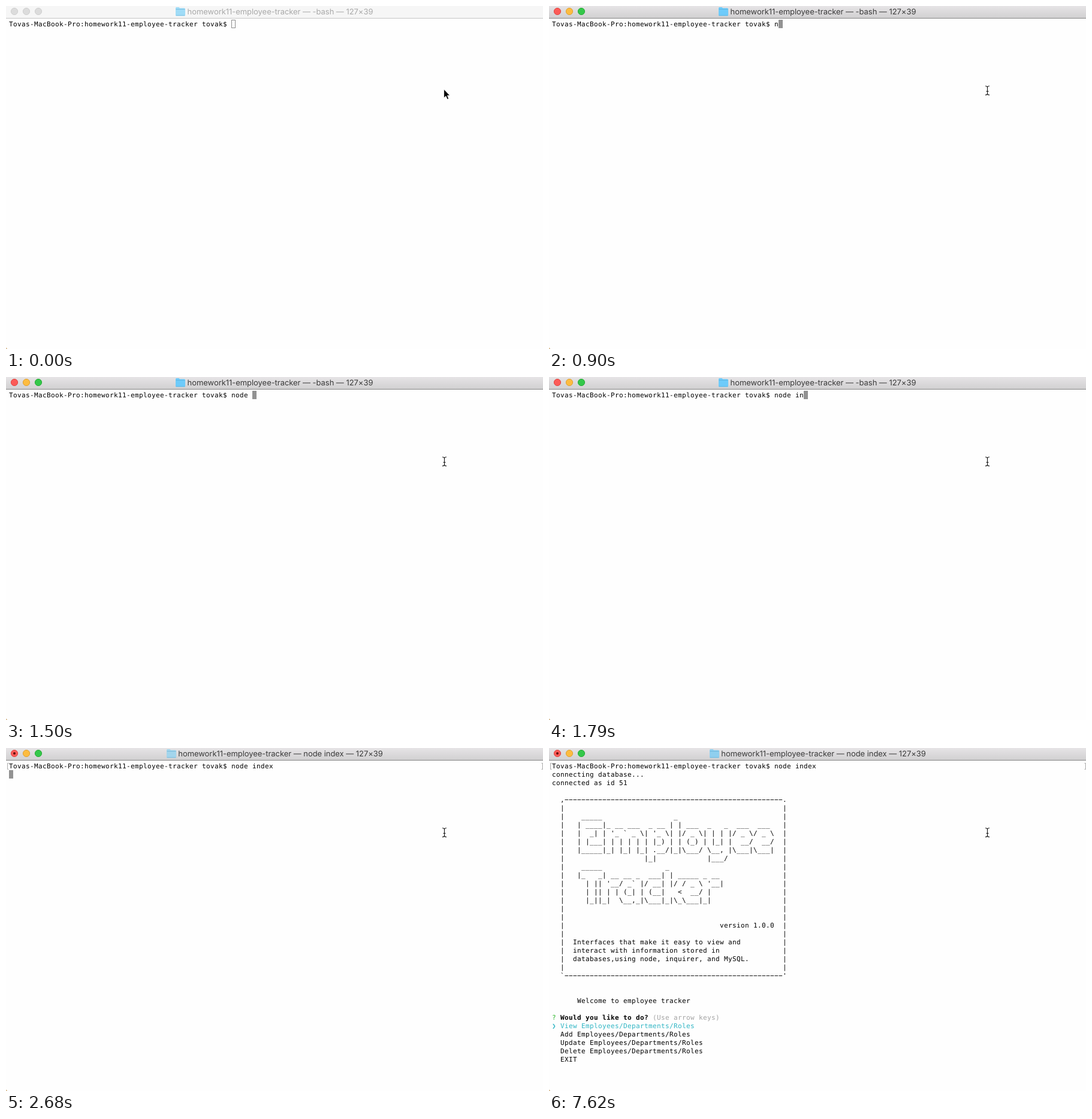
These frames come from a looping animation (896 by 573 pixels, 8000 ms). An HTML page:

```html
<!DOCTYPE html>
<html lang="en">
<head>
<meta charset="utf-8">
<title>Employee tracker</title>
<style>
html, body { margin: 0; width: 100%; height: 100%; overflow: hidden; background: #fefefe; }
svg { display: block; width: 100%; height: 100%; }
text { white-space: pre; text-rendering: geometricPrecision; }
#term text { font: 11px "DejaVu Sans Mono", monospace; letter-spacing: .3774px; }
#title { font: 13px Inter, sans-serif; letter-spacing: -.05px; text-anchor: middle; }
</style>
</head>
<body>
<svg id="stage" viewBox="0 0 896 573">
  <defs>
    <linearGradient id="barFill" x2="0" y2="1">
      <stop stop-color="#e6e4e6"/><stop offset="1" stop-color="#d1d0d1"/>
    </linearGradient>
  </defs>
  <rect width="896" height="573" fill="#fefefe"/>
  <rect id="bar" width="896" height="20"/>
  <rect id="rule" y="20" width="896" height="1"/>
  <g id="lights"></g>
  <circle id="busy" cx="14" cy="9" r="2" fill="#5c0b08"/>
  <g id="folder">
    <path d="M0 3.5q0-1.5 1.5-1.5h4l1.5 1.5h7.5q1.5 0 1.5 1.5v10q0 1.5-1.5 1.5h-13q-1.5 0-1.5-1.5z"/>
    <path d="M.5 5.5h15M.5 15.8h15" fill="none" stroke="#4a9cc6" stroke-opacity=".45"/>
  </g>
  <text id="title" y="14"></text>
  <path id="marks" d="M4.5 25.5h-2v10h2M893.5 25.5h2v10h-2" fill="none" stroke="#a8a8a8"/>
  <g id="term">
    <rect id="caret" width="7" height="14"/>
  </g>
  <path id="arrow" d="M730.6 139v14.6l3.4-3 2.2 5.3 2.5-1-2.2-5.2h4.4z" stroke="#fff" stroke-width=".9"/>
  <path id="beam" d="M728 133.8q3 0 3.4 1.8q.4-1.8 3.6-1.8M731.5 135.5v11.5M729.5 142.5h4M728 148.6q3 0 3.4-1.8q.4 1.8 3.6 1.8" fill="none" stroke="#111" stroke-width="1.1"/>
  <path d="M0 570q.5 2.5 2.5 3H0z" fill="#c79f62"/>
</svg>

<script type="text/plain" id="banner">

    _____                 _
   | ____|_ __ ___  _ __ | | ___  _   _  ___  ___
   |  _| | '_ ` _ \| '_ \| |/ _ \| | | |/ _ \/ _ \
   | |___| | | | | | |_) | | (_) | |_| |  __/  __/
   |_____|_| |_| |_| .__/|_|\___/ \__, |\___|\___|
                   |_|            |___/
    _____               _
   |_   _| __ __ _  ___| | _____ _ __
     | || '__/ _` |/ __| |/ / _ \ '__|
     | || | | (_| | (__|   <  __/ |
     |_||_|  \__,_|\___|_|\_\___|_|


                                     version 1.0.0

  Interfaces that make it easy to view and
  interact with information stored in
  databases,using node, inquirer, and MySQL.

</script>

<script>
const LOOP = 8000, CELL = 7, ROW = 14, LEFT = 5, TOP = 23;
const PROMPT = 'Tovas-MacBook-Pro:homework11-employee-tracker tovak$ ';
const COMMAND = 'node index';
// moment at which each typed character appears
const KEYS = [900, 1050, 1200, 1350, 1500, 1650, 1790, 1940, 1940, 2390];
const FOCUS = 300, ENTER = 2530, RUN = 2680, CONNECT = 7470, READY = 7620;
const CYAN = '#2fb5c4';

const $ = id => document.getElementById(id);

function add(parent, tag, attrs) {
  const el = document.createElementNS('http://www.w3.org/2000/svg', tag);
  set(el, attrs);
  parent.appendChild(el);
  return el;
}

function set(el, attrs) {
  for (const key in attrs) el.setAttribute(key, attrs[key]);
}

function show(el, on) {
  el.style.display = on ? '' : 'none';
}

function print(parent, row, text, col = 0, attrs = {}) {
  const el = add(parent, 'text', { x: LEFT + col * CELL, y: TOP + 11 + row * ROW, ...attrs });
  el.textContent = text;
  return el;
}

const term = $('term');
const line = print(term, 0, PROMPT);
const connecting = print(term, 1, 'connecting database...');
const screen = add(term, 'g', {});

function buildScreen() {
  const put = (...args) => print(screen, ...args);
  const edge = '\u2212'.repeat(52);
  const rows = $('banner').textContent.split('\n').slice(1, -1);

  put(2, 'connected as id 51');
  put(4, ',' + edge + '.', 2);
  rows.forEach((text, i) => put(5 + i, '|' + text.padEnd(52) + '|', 2));
  put(25, '`' + edge + "'", 2);
  put(28, 'Welcome to employee tracker', 6);
  put(30, '?', 0, { fill: '#2cb52b' });
  put(30, 'Would you like to do?', 2, { style: 'font-weight:bold' });
  put(30, '(Use arrow keys)', 24, { fill: '#a3a3a3' });
  put(31, '❯', 0, { fill: CYAN });
  ['View', 'Add', 'Update', 'Delete'].forEach((verb, i) =>
    put(31 + i, verb + ' Employees/Departments/Roles', 2, { fill: i ? '#000' : CYAN }));
  put(35, 'EXIT', 2);
}
buildScreen();

const lights = [['#fc5b57', '#df4744'], ['#fdbc40', '#dea034'], ['#34c84a', '#27aa35']].map(
  ([fill, stroke], i) => ({ fill, stroke, el: add($('lights'), 'circle', { cx: 14 + i * 20, cy: 9, r: 5.6 }) }));

function drawWindow(t) {
  const active = t >= FOCUS, running = t >= RUN;
  set($('bar'), { fill: active ? 'url(#barFill)' : '#f6f6f6' });
  set($('rule'), { fill: active ? '#858585' : '#c6c6c6' });
  for (const { el, fill, stroke } of lights)
    set(el, active ? { fill, stroke } : { fill: '#dcdcdc', stroke: '#cfcfcf' });
  show($('busy'), running);

  const blue = !active ? '#a0dcf7' : !running ? '#6ecbfa' : t < READY ? '#a3d5ec' : '#8fcfef';
  set($('folder'), { transform: `translate(${running ? 268 : 283} 0)`, fill: blue });
  const title = $('title');
  title.textContent = `homework11-employee-tracker — ${running ? 'node index' : '-bash'} — 127×39`;
  set(title, { x: running ? 458 : 457.5, fill: active ? '#3a3a3a' : '#a9a9a9' });

  show($('arrow'), !active);
  show($('beam'), active);
}

function drawCaret(t, typed) {
  const row = t < ENTER ? 0 : t < CONNECT ? 1 : 2;
  const x = LEFT + (row ? 0 : PROMPT.length + typed) * CELL;
  const y = TOP + row * ROW;
  const caret = $('caret');
  set(caret, t < FOCUS
    ? { x: x + .5, y: y + .5, width: 6, height: 13, fill: 'none', stroke: '#8c8c8c' }
    : { x, y, width: 7, height: 14, fill: '#929292', stroke: 'none' });
  show(caret, t < READY);
}

function draw(t) {
  const typed = KEYS.filter(key => t >= key).length;
  line.textContent = PROMPT + COMMAND.slice(0, typed);
  drawWindow(t);
  drawCaret(t, typed);
  show($('marks'), t >= ENTER);
  show(connecting, t >= CONNECT);
  show(screen, t >= READY);
}

const start = performance.now();
function tick() {
  draw((performance.now() - start) % LOOP);
  requestAnimationFrame(tick);
}
tick();
</script>
</body>
</html>
```
